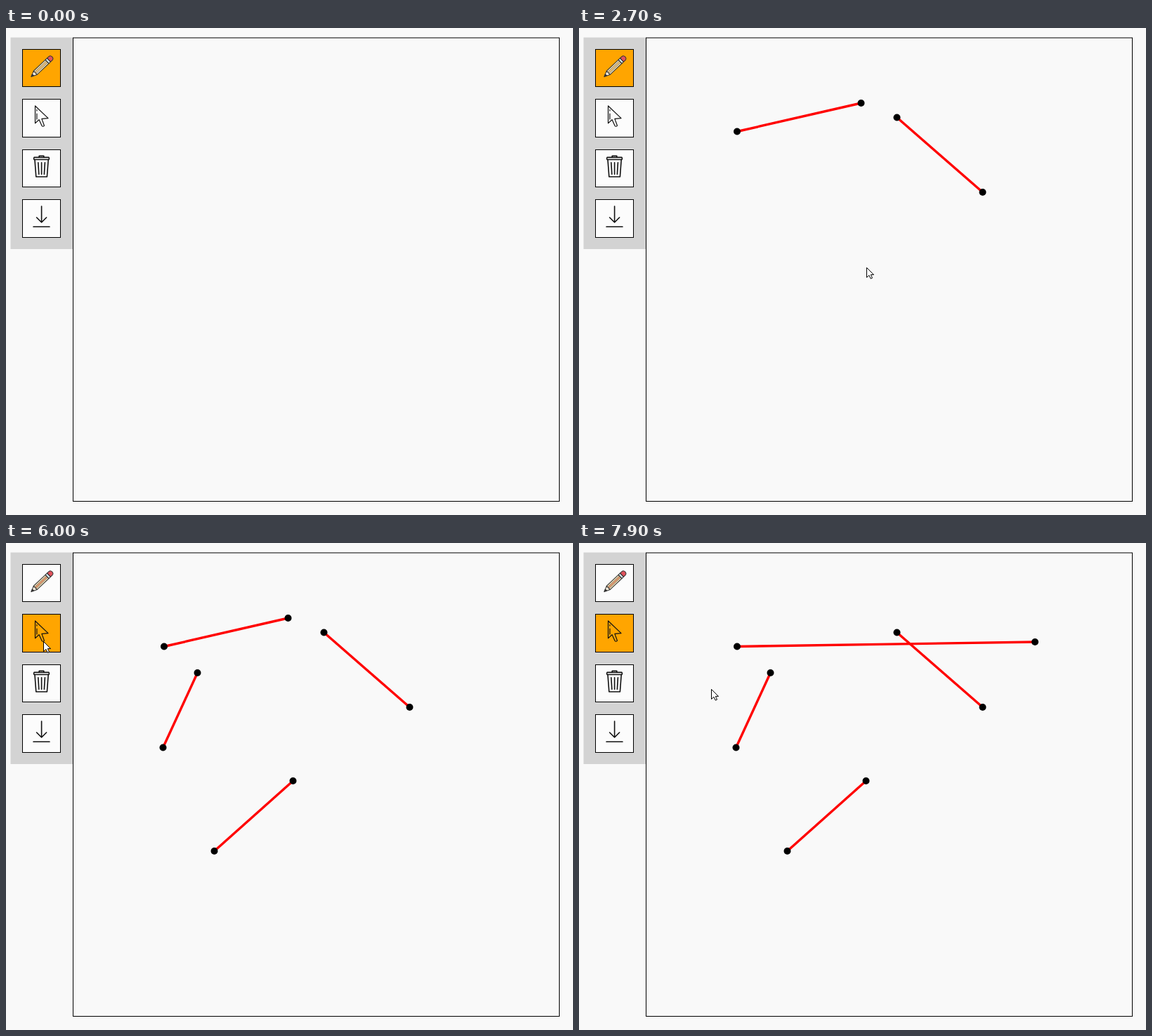
Write an HTML page that moves like this. It is 807 px wide and 694 px high and loops after 8000 ms.

```html
<!DOCTYPE html>
<html lang="en">
<head>
<meta charset="utf-8">
<title>Line editor</title>
<style>
  html, body { margin: 0; width: 100%; height: 100%; overflow: hidden; background: #f9f9f9; }
  svg { display: block; width: 807px; height: 694px; }
  .button { fill: #fcfcfc; stroke: #000; }
  .button.on { fill: #ffa500; }
  .icon { fill: none; stroke: #111; stroke-width: 1.6; stroke-linecap: round; stroke-linejoin: round; }
  .pointer { fill: #fff; stroke: #000; stroke-linejoin: round; }
</style>
</head>
<body>
<svg viewBox="0 0 807 694">
  <rect x="6.5" y="13.5" width="89" height="301.5" fill="#d3d3d3"/>
  <rect x="95.5" y="14" width="692" height="660.5" fill="#f9f9f9" stroke="#000"/>

  <rect class="button" id="draw" x="23.5" y="30.5" width="54" height="53"/>
  <rect class="button" id="select" x="23.5" y="101.5" width="54" height="54"/>
  <rect class="button" x="23.5" y="173.5" width="54" height="53"/>
  <rect class="button" x="23.5" y="244.5" width="54" height="54"/>

  <g transform="translate(36 69.3) rotate(-43.5)" stroke="#333" stroke-linejoin="round">
    <path d="M0 0L8-3.6V3.6Z" fill="#f4ecdc"/>
    <path d="M0 0L3.5-1.6V1.6Z" fill="#333"/>
    <path d="M8-3.6H31V3.6H8Z" fill="#e6d9b4"/>
    <path id="wood" d="M8.5-1.2H31V1.2H8.5Z" stroke-width=".5"/>
    <path d="M31-3.6H34.5V3.6H31Z" fill="#cfe3e8"/>
    <path d="M34.5-3.6H37.5Q41-3.6 41 0T37.5 3.6H34.5Z" fill="#e0525c"/>
  </g>

  <g class="icon">
    <path stroke-width="1.2" d="M41.5 111V135.7L47 130.6L51 139.3Q52.5 141.2 54.5 139.2L50.9 129.4L60 128.6Z
      M43.9 116.5V118M43.9 122V130"/>
    <path d="M40 184.4H61Q62 186 61 187.5H40Q39 186 40 184.4ZM47.2 184.2V182.3H53.8V184.2
      M41 188L42.8 212H58.4L60.2 188M45.8 191.8L46.8 208.5M50.6 191.8V208.5M55.4 191.8L54.4 208.5"/>
    <path d="M50.6 254V276.8M43.6 270L50.6 277L57.6 270M39 283.3H62"/>
  </g>

  <g id="lines"></g>

  <path class="pointer" id="arrow" d="M.5.5V14.5L3.9 11.4L6.2 16.2L8.5 15.2L6.3 10.6H10.5Z"/>
  <path class="pointer" id="hand" d="M-3 6.5Q-3.5 4-5.5 1.5Q-7.3-1.3-6-2Q-5-2.2-3.6 0L-4.5-4Q-4.7-6-3.5-6
    Q-2.4-6-2-4Q-2-6.7-.5-6.7T1-4.5Q1.3-6.5 2.6-6.2T3.8-4Q4.3-5.2 5.3-4.8T6.3-2Q6.2 1 5 3.5L4.5 6.5Z"/>
</svg>
<script>
const LOOP = 8000, STEP = 100, ENTER = 300;
const LAG = 30;    // a dragged end trails the cursor by this much
const REACH = 24;  // the hand appears this close to a line's end
const $ = id => document.getElementById(id);

const smooth = s => s * s * (3 - 2 * s);
const linear = s => s;

// The session is recorded as actions on a running clock.
const moves = [], lines = [];
let clock = ENTER, spot = [740, 66];

function wait(ms) {
  clock += ms;
}

function move(ms, x, y, ease = smooth) {
  moves.push({ start: clock, ms, from: spot, to: [x, y], ease });
  spot = [x, y];
  clock += ms;
}

function grab(line, action) {
  const drag = { press: clock };
  line.drags.push(drag);
  action();
  drag.release = clock;
}

function draw(ms, x, y) {
  const line = { start: spot, drags: [] };
  lines.push(line);
  grab(line, () => move(ms, x, y));
}

move(200, 195, 180);
wait(100);
move(300, 179, 157);
wait(200);
move(250, 225, 147.5);
draw(450, 401.5, 107);
move(200, 452.5, 127.5);
wait(50);
draw(450, 574.5, 234);
move(200, 408.5, 339);
wait(50);
draw(250, 296.5, 439);
move(300, 223.5, 291.5);
draw(500, 272.5, 185);
move(100, 320, 229);
move(500, 407, 245);
wait(100);
move(400, 129, 87, linear);
move(300, 53, 138);
wait(800);
const selectTime = clock;
move(800, 401.5, 107);
wait(100);
grab(lines[0], () => {
  move(200, 531, 86, linear);
  move(200, 605, 78, linear);
  move(300, 649, 141);
});
wait(100);
move(200, 187.5, 206);

function cursorAt(t) {
  const { start, ms, from, to, ease } = moves.findLast(m => m.start <= t) || moves[0];
  const s = ease(Math.min(Math.max((t - start) / ms, 0), 1));
  return from.map((v, i) => v + (to[i] - v) * s);
}

function endAt(line, t) {
  const drag = line.drags.findLast(d => d.press <= t);
  return drag && cursorAt(Math.min(Math.max(t - LAG, drag.press), drag.release - .01));
}

function show(el, visible) {
  el.style.display = visible ? "" : "none";
}

function set(el, attrs) {
  for (const key in attrs) el.setAttribute(key, attrs[key]);
  return el;
}

function add(parent, name, attrs) {
  const el = document.createElementNS("http://www.w3.org/2000/svg", name);
  return parent.appendChild(set(el, attrs));
}

for (const line of lines) {
  const [x, y] = line.start;
  line.group = add($("lines"), "g");
  line.stroke = add(line.group, "line", { x1: x, y1: y, stroke: "#f00", "stroke-width": 3.4 });
  add(line.group, "circle", { cx: x, cy: y, r: 5 });
  line.dot = add(line.group, "circle", { r: 5 });
}

function render(t) {
  const selecting = t >= selectTime, inside = t >= ENTER;
  const [cx, cy] = cursorAt(t);
  let near = false;

  $("draw").classList.toggle("on", !selecting);
  $("select").classList.toggle("on", selecting);
  $("wood").setAttribute("fill", selecting ? "#f0a070" : "#f3c87f");

  for (const line of lines) {
    const end = endAt(line, t);
    show(line.group, end);
    if (!end) continue;
    const [x, y] = end;
    set(line.stroke, { x2: x, y2: y });
    set(line.dot, { cx: x, cy: y });
    near ||= Math.hypot(x - cx, y - cy) < REACH;
  }

  const hand = selecting && near;
  show($("hand"), inside && hand);
  show($("arrow"), inside && !hand);
  set($("hand"), { transform: `translate(${cx} ${cy + 1})` });
  set($("arrow"), { transform: `translate(${Math.round(cx)} ${Math.round(cy + 2)})` });
}

const begin = performance.now();
function tick() {
  const t = (performance.now() - begin) % LOOP;
  render(Math.floor(t / STEP) * STEP);
  requestAnimationFrame(tick);
}
tick();
</script>
</body>
</html>
```
